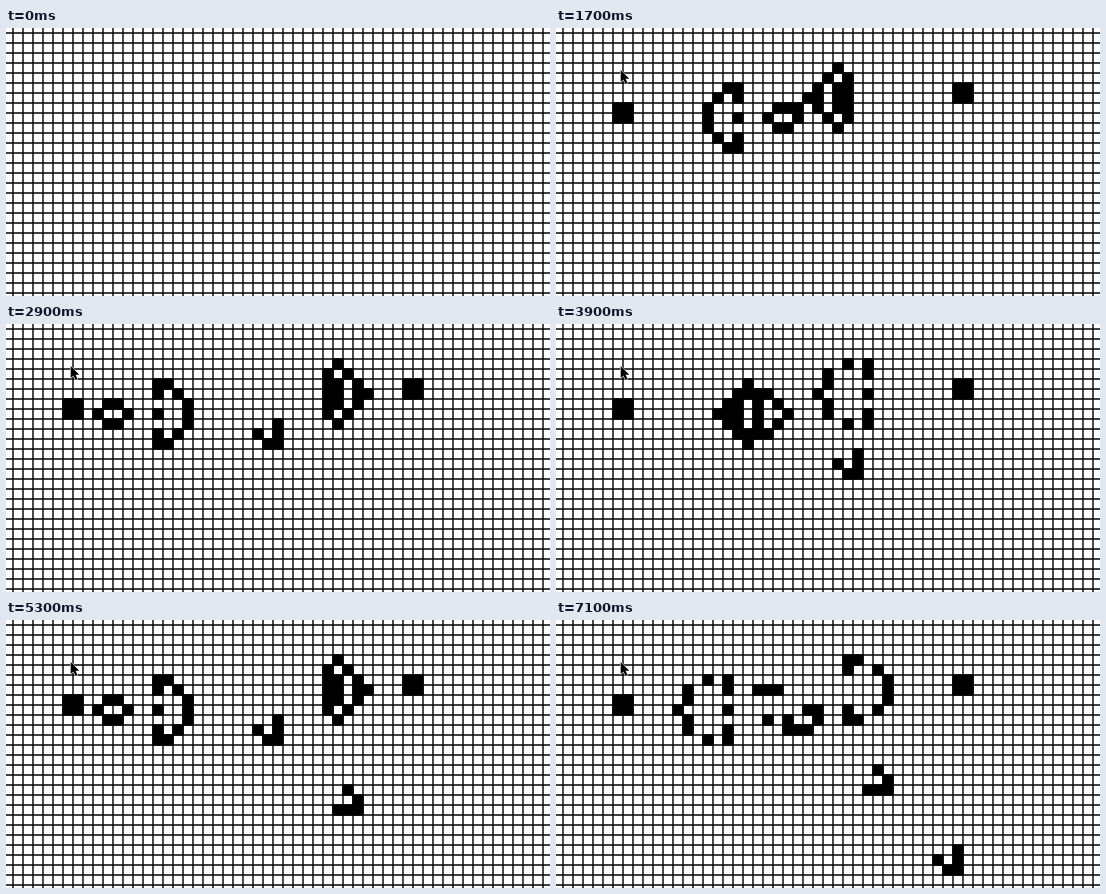
Animation of 544x268 px, one loop 7200 ms. Source, as an HTML page:

```html
<!DOCTYPE html>
<html lang="en">
<head>
<meta charset="utf-8">
<title>Glider gun</title>
<style>
  html, body { margin: 0; width: 100%; height: 100%; overflow: hidden; background: #fff; }
  svg { display: block; width: 100vw; height: 100vh; }
</style>
</head>
<body>
<svg viewBox="0 0 544 268">
  <rect width="544" height="268" fill="#fff"/>
  <path id="grid" stroke="#000" stroke-width="1.4" fill="none"/>
  <path id="cells" fill="#000"/>
  <path id="cursor" d="M0 0V12L2.8 9.5L4.8 14L6.8 13.1L4.9 8.8H8.6Z"
        fill="#000" stroke="#fff" stroke-width="1" paint-order="stroke"/>
</svg>
<script>
const LOOP = 7200, TICK = 100;
const ENTER = 600, DROP = 1400, START = 1520, GEN = 80;
const SIZE = 10, LEFT = 57, TOP = 35;

// Columns of the live cells, row by row
const GUN = [
  [24],
  [22, 24],
  [12, 13, 20, 21, 34, 35],
  [11, 15, 20, 21, 34, 35],
  [0, 1, 10, 16, 20, 21],
  [0, 1, 10, 14, 16, 17, 22, 24],
  [10, 16, 24],
  [11, 15],
  [12, 13]
];

const el = id => document.getElementById(id);
const grid = el('grid'), cells = el('cells'), cursor = el('cursor');

function gridPath() {
  let d = '';
  for (let x = 7; x < 544; x += SIZE) d += `M${x} 0V268`;
  for (let y = 5; y < 268; y += SIZE) d += `M0 ${y}H544`;
  return d;
}

function nextGen(live) {
  const count = new Map();
  for (const key of live) {
    const [x, y] = key.split(',').map(Number);
    for (let dy = -1; dy <= 1; dy++)
      for (let dx = -1; dx <= 1; dx++) {
        if (!dx && !dy) continue;
        const k = `${x + dx},${y + dy}`;
        count.set(k, (count.get(k) || 0) + 1);
      }
  }
  const next = new Set();
  for (const [k, n] of count)
    if (n === 3 || (n === 2 && live.has(k))) next.add(k);
  return next;
}

// Each cell also covers the grid lines around it
function cellPath(live) {
  let d = '';
  for (const key of live) {
    const [x, y] = key.split(',').map(Number);
    d += `M${LEFT + x * SIZE - 0.8} ${TOP + y * SIZE - 0.8}h11.6v11.6h-11.6z`;
  }
  return d;
}

const paths = [];
let live = new Set(GUN.flatMap((row, y) => row.map(x => `${x},${y}`)));
for (let g = 0; g <= Math.floor((LOOP - START) / GEN); g++) {
  paths.push(cellPath(live));
  live = nextGen(live);
}

function pointer(t) {
  const rest = Math.max(0, (DROP - t) / 900);
  return [64.7 + 50 * rest ** 0.9, 42 + 230 * rest ** 1.53];
}

const snap = (v, origin) => Math.floor((v - origin) / SIZE) * SIZE;

function draw(time) {
  const t = Math.floor((time % LOOP) / TICK) * TICK;
  const [px, py] = pointer(t);
  cursor.setAttribute('visibility', t < ENTER ? 'hidden' : 'visible');
  cursor.setAttribute('transform', `translate(${px} ${py})`);

  let d = '', dx = 0, dy = 0;
  if (t >= START) {
    d = paths[Math.floor((t - START) / GEN)];
  } else if (t >= ENTER && t < DROP) {
    // The carried pattern sits one cell below and right of the pointer
    d = paths[0];
    dx = snap(px, LEFT) + SIZE;
    dy = snap(py, TOP) + SIZE;
  }
  cells.setAttribute('d', d);
  cells.setAttribute('transform', `translate(${dx} ${dy})`);
}

grid.setAttribute('d', gridPath());
const begin = performance.now();
function loop() {
  draw(performance.now() - begin);
  requestAnimationFrame(loop);
}
loop();
</script>
</body>
</html>
```
